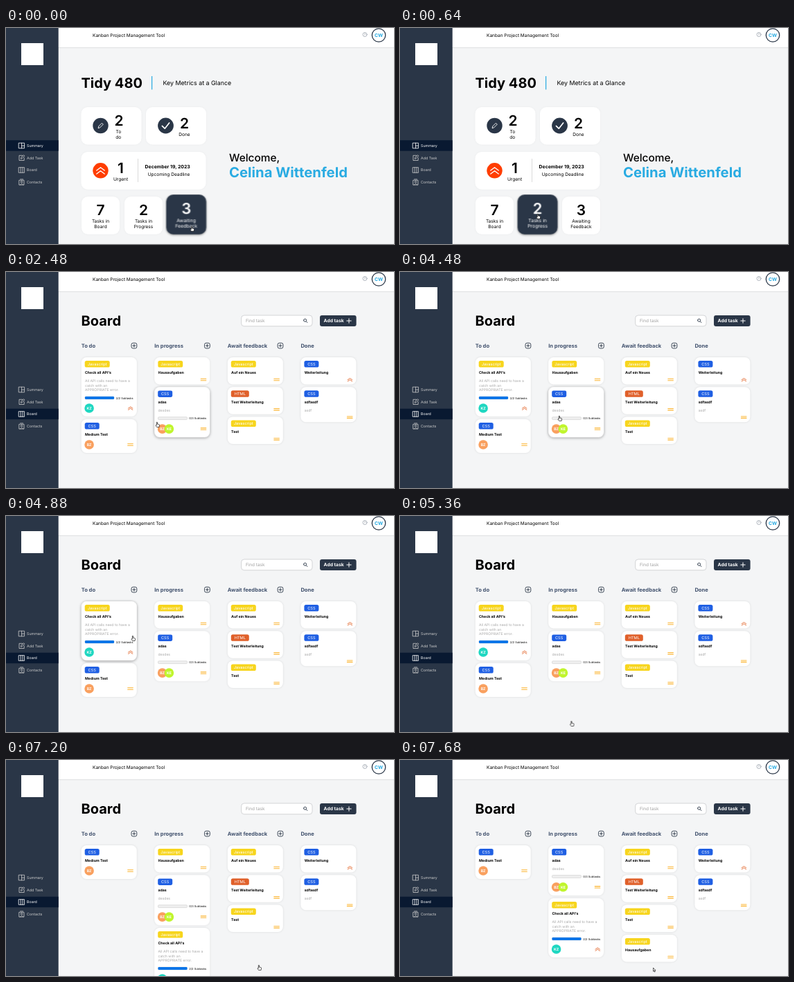
An HTML page for the animation above (8 s loop, 560 by 314 pixels).

```html
<!DOCTYPE html>
<html lang="en">
<head>
<meta charset="utf-8">
<title>Kanban board</title>
<style>
html, body { margin: 0; width: 100%; height: 100%; overflow: hidden; background: #f4f5f6; }
svg { display: block; width: 100vw; height: 100vh; font-family: Inter, Roboto, sans-serif; text-rendering: geometricPrecision; }
text { fill: currentColor; }
.b { font-weight: 700; }
.c { text-anchor: middle; }
.line { fill: none; stroke: currentColor; stroke-linecap: round; stroke-linejoin: round; }
.h1 { font-size: 20px; font-weight: 700; }
.num { font-size: 20.9px; font-weight: 600; text-anchor: middle; }
.lab { font-size: 6.55px; text-anchor: middle; }

/* 1% of the loop is 80 ms */
.a { animation: 8s step-end infinite; }
#summary { animation-name: first; }
#board { animation-name: second; }
@keyframes first { 0% { visibility: visible } 31%, 100% { visibility: hidden } }
@keyframes second { 0% { visibility: hidden } 31%, 100% { visibility: visible } }

/* summary tiles */
.tile { fill: #fff; color: #000; filter: drop-shadow(0 0 1.5px #0000000a); }
#urgent { transform-origin: 108.5px 180px; animation-name: urgent; }
#progress { transform-origin: 198.5px 300px; animation-name: progress; }
#await { transform-origin: 289px 300px; animation-name: await; }
@keyframes await {
  0% { fill: #2a3647; color: #fff; transform: scale(1.05); filter: drop-shadow(0 1px 1.5px #0006) }
  2% { fill: #fff; color: #000; transform: none; filter: drop-shadow(0 0 1.5px #0000000a) }
}
@keyframes progress {
  2% { fill: #2a3647; color: #fff; transform: scale(1.05); filter: drop-shadow(0 1px 1.5px #0006) }
  14% { fill: #fff; color: #000; transform: none; filter: drop-shadow(0 0 1.5px #0000000a) }
}
@keyframes urgent {
  14% { fill: #2a3647; color: #fff; transform: scale(1.05); filter: drop-shadow(0 1px 1.5px #0006) }
  31% { fill: #fff; color: #000; transform: none; filter: drop-shadow(0 0 1.5px #0000000a) }
}

/* board cards: place and hover shadow */
.face { fill: #fff; filter: drop-shadow(0 0 1.5px #0000001c); }
.lift { fill: #fff; opacity: 0; filter: drop-shadow(0 1px 2px #00000052); }
#check { animation-name: check; }
#medium { animation-name: medium; }
#haus { animation-name: haus; }
#adas { animation-name: adas; }
@keyframes check { 72% { transform: translate(105.5px, 120px) } 93%, 100% { transform: translate(105.5px, 77px) } }
@keyframes medium { 72%, 100% { transform: translate(0, -90px) } }
@keyframes haus { 93%, 100% { transform: translate(105.6px, 130px) } }
@keyframes adas { 93%, 100% { transform: translate(0, -43.3px) } }
#check .lift { animation-name: checkLift; }
#haus .lift { animation-name: hausLift; }
#adas .lift { animation-name: adasLift; }
@keyframes checkLift { 61% { opacity: 1 } 67% { opacity: 0 } 72% { opacity: 1 } 81% { opacity: 0 } }
@keyframes hausLift { 82% { opacity: 1 } 89% { opacity: 0 } }
@keyframes adasLift { 31% { opacity: 1 } 60% { opacity: 0 } 81% { opacity: 1 } 82% { opacity: 0 } }

/* pointer */
#pointer { animation-name: path; }
#hand { animation-name: hand; }
#arrow { animation-name: arrow; }
@keyframes hand { 0% { visibility: visible } 93%, 100% { visibility: hidden } }
@keyframes arrow { 0% { visibility: hidden } 93%, 100% { visibility: visible } }
@keyframes path {
  0% { transform: translate(269px, 292px) }
  1% { transform: translate(252px, 291px) }
  2% { transform: translate(222px, 289px) }
  3% { transform: translate(206px, 287px) }
  4% { transform: translate(198px, 285px) }
  6% { transform: translate(197px, 282px) }
  7% { transform: translate(198px, 277px) }
  8% { transform: translate(200px, 274px) }
  14% { transform: translate(208px, 230px) }
  15% { transform: translate(214px, 226px) }
  18% { transform: translate(217px, 223px) }
  19% { transform: translate(219px, 222px) }
  43% { transform: translate(221px, 220px) }
  44% { transform: translate(224px, 218px) }
  45% { transform: translate(227px, 216px) }
  46% { transform: translate(229px, 214px) }
  47% { transform: translate(231px, 213px) }
  58% { transform: translate(226px, 208px) }
  60% { transform: translate(200px, 188px) }
  61% { transform: translate(184px, 178px) }
  62% { transform: translate(168px, 170px) }
  63% { transform: translate(158px, 166px) }
  64% { transform: translate(154px, 165px) }
  67% { transform: translate(248.5px, 302px) }
  68% { transform: translate(249px, 301px) }
  79% { transform: translate(248px, 296px) }
  80% { transform: translate(248px, 255px) }
  81% { transform: translate(248px, 205px) }
  82% { transform: translate(248px, 162px) }
  83% { transform: translate(248px, 150px) }
  89% { transform: translate(340px, 280px) }
  90% { transform: translate(366px, 302px) }
  93%, 100% { transform: translate(367px, 305px) }
}
</style>
</head>
<body>
<svg viewBox="0 0 560 314" preserveAspectRatio="none">
  <rect width="560" height="314" fill="#f4f5f6"/>
  <rect x="75" y="28" width="485" height="1.2" fill="#e2e3e4"/>
  <rect x="75" width="485" height="28" fill="#fff"/>
  <text x="125" y="12.8" font-size="6.54">Kanban Project Management Tool</text>
  <g color="#7d8794">
    <circle class="line" cx="518" cy="9.5" r="3" stroke-width=".6"/>
    <text class="c" x="518" y="11.2" font-size="4.6">?</text>
  </g>
  <circle cx="538" cy="10.5" r="9.7" fill="#fff" stroke="#2a3647" stroke-width="1.3"/>
  <text class="b c" x="538" y="13" font-size="6.8" color="#29abe2">CW</text>
  <rect width="75.7" height="314" fill="#2a3647"/>
  <rect x="22" y="22" width="32" height="32" fill="#fff"/>

  <g id="summary" class="a"></g>
  <g id="board" class="a"></g>

  <g id="pointer" class="a" fill="#fff" stroke="#111" stroke-width=".7" stroke-linejoin="round">
    <path id="hand" class="a" d="M-1.7.8V-3.2a.6.6 0 0 1 1.2 0V-.9L1.8-.5Q2.7-.3 2.6.7L2 3.6H-1.3L-3 1.2Q-2.8-.1-1.7.8Z"/>
    <path id="arrow" class="a" d="M-1.6-3V2.2L-.5 1.2 .3 3.1 1.2 2.7 .4 .9H2Z"/>
  </g>
</svg>
<script>
const text = (x, y, s, cls = '', size = '', color = '') =>
  `<text x="${x}" y="${y}" class="${cls}"${size && ` font-size="${size}"`}${color && ` color="${color}"`}>${s}</text>`;
const box = (x, y, w, h, r, attrs = '') =>
  `<rect x="${x}" y="${y}" width="${w}" height="${h}" rx="${r}" ${attrs}/>`;
const dot = (x, y, r, fill) => `<circle cx="${x}" cy="${y}" r="${r}" fill="${fill}"/>`;
const line = (d, color, w = 0.8) => `<path class="line" d="${d}" color="${color}" stroke-width="${w}"/>`;

// navigation, icons drawn around their centre
const items = [
  ['Summary', 171, 'M-4-3.8H4V3.8H-4ZM0-3.8V3.8M0 .2H4'],
  ['Add Task', 188.7, 'M1-3.4H-3.6V3.8H3.6V0M-1 1.2L-.6-.8 3-4 4.2-2.8 .8 .8Z'],
  ['Board', 206.5, 'M-4-3.8H4V3.8H-4ZM-1.4-3.8V3.8M1.4-3.8V3.8'],
  ['Contacts', 224.3, 'M-3.4-3H3.4V3.8H-3.4ZM-2-4.4H2M-1.2-.6A1.2 1.2 0 1 0 1.2-.6 1.2 1.2 0 1 0-1.2-.6M-2.2 3.6Q0 .6 2.2 3.6']
];
const nav = active => items.map(([name, y, d]) => {
  const on = name === active, color = on ? '#fff' : '#cdcdcd';
  return (on ? box(0, y - 7.8, 75.7, 15.5, 0, 'fill="#091931"') : '') +
    `<g transform="translate(22.6 ${y})">${line(d, color, 0.8)}</g>` + text(30, y + 1.9, name, '', 5.3, color);
}).join('');

// summary page
const tile = (id, x, y, w, h, body) =>
  `<g id="${id}" class="tile a">${box(x, y, w, h, 9.5)}${body}</g>`;
const labels = (x, y, ...rows) => rows.map((s, i) => text(x, y + i * 7.9, s, 'lab')).join('');
const small = (id, x, n, a, b) =>
  tile(id, x, 245, 55, 55, text(x + 27.5, 272, n, 'num') + labels(x + 27.5, 283.3, a, b));

document.getElementById('summary').innerHTML = nav('Summary') +
  text(108.5, 87.3, 'Tidy 480', 'h1') +
  box(210, 70, 1.2, 19.5, 0, 'fill="#29abe2"') +
  text(226.5, 83, 'Key Metrics at a Glance', '', 8.83) +
  `<g font-weight="500">${text(322, 194, 'Welcome,', '', 15.4)}</g>` +
  text(322, 217, 'Celina Wittenfeld', 'b', 20.3, '#29abe2') +
  tile('todo', 108.5, 115, 87, 54.5,
    dot(136.5, 142, 11.2, '#2a3647') +
    line('M133.2 145.3L133.8 142.8 138.4 138.2 140.3 140.1 135.7 144.7Z', '#fff', 0.9) +
    text(163, 141.5, 2, 'num') + labels(162.3, 153.2, 'To', 'do')) +
  tile('done', 202, 115, 87, 54.5,
    dot(230.5, 142, 11.4, '#2a3647') + line('M225.4 142.4L229.2 146.2 235.6 138', '#fff', 1.7) +
    text(257.5, 145.5, 2, 'num') + labels(257.5, 157.2, 'Done')) +
  tile('urgent', 108.5, 180, 180, 54.7,
    dot(136.5, 207.3, 11.2, '#ff3d00') +
    line('M130.8 207L136.5 202.8 142.2 207M130.8 212L136.5 207.8 142.2 212', '#fff', 1.4) +
    text(165.3, 211.3, 1, 'num') + labels(165.5, 221.8, 'Urgent') +
    box(190.2, 190, 0.8, 34, 0, 'fill="#d1d1d1"') +
    text(233.2, 203.8, 'December 19, 2023', 'b c', 6.9) + labels(235, 215.3, 'Upcoming Deadline')) +
  small('all', 109, 7, 'Tasks in', 'Board') +
  small('progress', 171, 2, 'Tasks in', 'Progress') +
  small('await', 234, 3, 'Awaiting', 'Feedback');

// board page
const cols = [108.7, 214.2, 319.8, 425.4];
const tags = { Javascript: [36, '#f7d51d'], CSS: [21, '#1f5fe3'], HTML: [26, '#e0602a'] };
const avatars = list => list.map(([s, fill], i) =>
  dot(11.4 + i * 9.8, 0, 6.8, fill) + text(11.4 + i * 9.8, 1.9, s, 'b c', 5.2, '#fff')).join('');
const prio = hot => hot
  ? line('M67.8 .2L71-2 74.2 .2M67.8 2.4L71 .2 74.2 2.4', '#e2662c', 0.9)
  : line('M67-1.2H74.6M67 1.2H74.6', '#fcb32c', 1.1);

function card(id, col, y, h, tag, title, o = {}) {
  const [w, fill] = tags[tag];
  const desc = (o.desc || []).map((s, i) => text(5.3, 36 + i * 6.5, s, '', 5.1, '#a8a8a8')).join('');
  let bar = '';
  if (o.bar) {
    const [by, done, all] = o.bar;
    bar = box(5.3, by - 1.9, 42, 3.8, 1.2, 'fill="#efefef" stroke="#c4c4c4" stroke-width=".5"') +
      (done ? box(5.3, by - 2, 42 * done / all, 4, 1.2, 'fill="#0a75e8"') : '') +
      text(50, by + 1.5, `${done}/${all} Subtasks`, '', 4);
  }
  return `<g id="${id}" class="a"><g transform="translate(${cols[col]} ${y})">
    ${box(0, 0, 80, h, 7.5, 'class="face"')}${box(0, 0, 80, h, 7.5, 'class="lift a"')}
    ${box(5, 5, w, 9.6, 2.6, `fill="${fill}"`)}${text(5 + w / 2, 11.9, tag, 'c', 5.7, '#fff')}
    ${text(5.3, 24, title, 'b', 5.23)}${desc}${bar}
    <g transform="translate(0 ${o.foot || 32.5})">${avatars(o.who || [])}${prio(o.hot)}</g>
  </g></g>`;
}

const heads = ['To do', 'In progress', 'Await feedback', 'Done'].map((s, i) =>
  text(cols[i], 110.2, s, 'b', 7.6, '#42526e') + (i < 3
    ? box(cols[i] + 72.3, 103.2, 7.8, 7.8, 2.4, 'fill="none" stroke="#2a3647" stroke-width=".9"') +
      line(`M${cols[i] + 74.2} 107.1h4m-2-2v4`, '#2a3647', 0.9)
    : '')).join('');
const bz = ['BZ', '#f9a05f'];

document.getElementById('board').innerHTML = nav('Board') +
  text(108.5, 78.3, 'Board', 'h1') +
  box(339.7, 63, 102.3, 15.8, 4, 'fill="#fff" stroke="#c3c5c8" stroke-width=".7"') +
  text(346, 73.2, 'Find task', '', 6.4, '#a0a0a0') +
  line('M429.6 70.2a2 2 0 1 0 4 0a2 2 0 1 0-4 0M433.1 71.7L435 73.6', '#2a3647', 0.9) +
  box(453, 63, 52.6, 16, 3, 'fill="#2a3647"') +
  text(458.5, 73.4, 'Add task', 'b', 6.75, '#fff') +
  line('M491.8 71h6.4m-3.2-3.2v6.4', '#fff', 1) +
  heads +
  card('check', 0, 124, 86, 'Javascript', 'Check all API\'s', {
    desc: ['All API calls need to have a', 'catch with an', 'APPROPRIATE error.'],
    bar: [59, 2, 2], foot: 74, who: [['KZ', '#1fd7c1']], hot: true
  }) +
  card('medium', 0, 214, 49, 'CSS', 'Medium Test', { foot: 37, who: [bz] }) +
  card('haus', 1, 124, 39.5, 'Javascript', 'Hausaufgaben') +
  card('adas', 1, 167.3, 73, 'CSS', 'adas', {
    desc: ['desdes'], bar: [45.4, 0, 3], foot: 60.8, who: [bz, ['KE', '#c0f52d']]
  }) +
  card('neues', 2, 124, 39.5, 'Javascript', 'Auf ein Neues') +
  card('weiter', 2, 167.2, 39.5, 'HTML', 'Test Weiterleitung') +
  card('test', 2, 210.4, 39.5, 'Javascript', 'Test') +
  card('done1', 3, 124, 39.5, 'CSS', 'Weiterleitung', { hot: true }) +
  card('done2', 3, 167.2, 51, 'CSS', 'sdfasdf', { desc: ['asdf'], foot: 44 });
</script>
</body>
</html>
```
